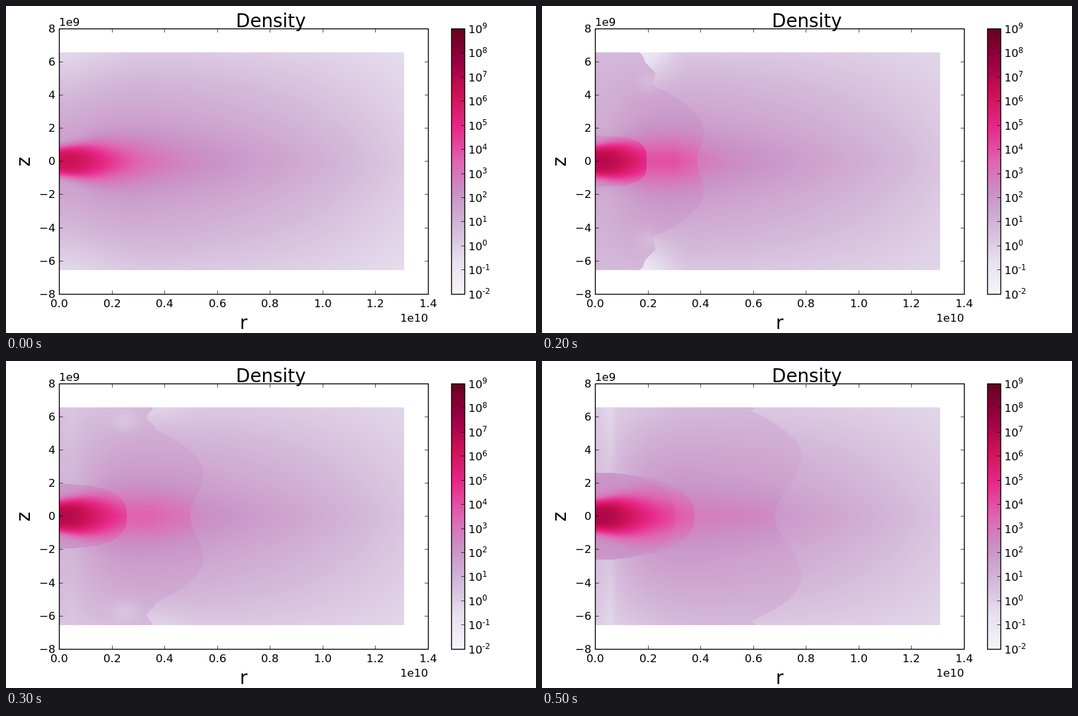
Write an HTML page with a canvas that moves like this. It is 800 px wide and 494 px high and loops after 0.6 s.

```html
<!DOCTYPE html>
<html lang="en">
<head>
<meta charset="utf-8">
<title>Density</title>
<style>
html, body { margin: 0; width: 100%; height: 100%; overflow: hidden; background: #fff; }
canvas { display: block; }
</style>
</head>
<body>
<canvas id="stage" width="800" height="494"></canvas>
<script>
const STEP = 100, COUNT = 6;
const W = 521, HALF = 165, H = 2 * HALF - 1;   // density map, in pixels
const LEFT = 80, TOP = 70;
const AX = { x: 80.5, y: 34.42, w: 557, h: 400.8 };
const FONT = '"DejaVu Sans", Verdana, sans-serif';
const STOPS = ['f7f4f9', 'e7e1ef', 'd4b9da', 'c994c7', 'df65b0', 'e7298a', 'ce1256', '980043', '67001f'];
const ctx = document.getElementById('stage').getContext('2d');

const clamp = (x, a = 0, b = 1) => Math.min(b, Math.max(a, x));
const smooth = x => { x = clamp(x); return x * x * (3 - 2 * x); };
const bell = x => Math.exp(-x * x);
const snap = x => Math.floor(x) + .5;

// Undisturbed disc, in log10 density by radius u
const mantle = u => 2.3 - 2.2 * (u / W) ** 2 - .35 * bell(u / 50);
const hot = u => 4.35 / (1 + (u / 85) ** 2.5);
const width = u => 22 + 18 * (1 - Math.exp(-u / 100));
const sharpness = u => 2 + 2 * bell(u / 50);

// A zone falls from its mantle to its far value with height v, plus a hot midplane
function zone({ mid, far, heat, wide = width, power = 2.2 }) {
  const table = f => Float32Array.from({ length: W }, (_, u) => f(u));
  const [m, f, a, w, q] = [mid, far, heat, wide, sharpness].map(table);
  const fall = Float32Array.from({ length: HALF }, (_, v) => 1 - (v / HALF) ** power);
  return (u, v) => f[u] + (m[u] - f[u]) * fall[v]
    + (v < 110 ? a[u] * Math.exp(-((v / w[u]) ** q[u])) : 0);
}

const ambient = k => {
  const gain = k ? .2 : 0;
  return zone({
    mid: u => mantle(u) + gain * (u / W) ** 2,
    far: u => .3 - .65 * bell(u / 80) - .75 * (u / W) ** 2 + gain * (u / W),
    heat: hot,
    power: 1.3
  });
};

// Gas behind the outer shock at step k
const shocked = k => zone({
  mid: u => mantle(u) + .15 + .35 / k - 1.8 * (1 - 1 / k) * bell(u / 60),
  far: u => .75 - .7 * clamp((k - 2) / 2) * bell(u / 90),
  heat: u => Math.min(hot(u) + .2, 2.2 - .35 * k),
  wide: () => 35,
  power: 1.2
});

const inner = () => zone({
  mid: () => 2.4,
  far: () => .5,
  heat: u => hot(u) + .15,
  wide: u => width(u) * 1.1,
  power: 1.2
});

// Outer shock radius by height: a bulging front joined to a polar plume
function outerEdge(k) {
  const nose = 100 * k ** .62, bulge = 10 * (k - 1), peak = 45 * Math.sqrt(k - 1);
  const plume = 46 * k + 2, tip = 98 * k ** .9;
  return v => {
    const front = v < peak
      ? nose + bulge * smooth(v / peak)
      : nose + bulge - .016 * (v - peak) ** 2;
    const column = v < tip
      ? plume * Math.sqrt(1 - (v / tip) ** 6) * (1 + .04 * Math.sin(v / 5))
      : -1;
    return Math.max(front > 0 ? front : -1, column);
  };
}

// Rounded box with half axes a and b
const dome = (a, b, n) => v => v < b ? a * (1 - (v / b) ** n) ** (1 / n) : -1;

const coreEdge = k => dome(30 + 24 * k, 18 + 46 * ((k - 1) / 4) ** .6, 2.2 + 4 / k ** 2);
const echoEdge = k => k < 4 ? () => -1 : dome(92 + 29 * (k - 4), 31 + 35 * (k - 4), 2.4);

// Thin gas in the wake: a vortex in the plume and a streak beside the pole
function wake(k, u, v) {
  const vortex = .55 * bell((u - 40 - 20 * k) / (8 + 4 * k)) * bell((v - 70 - 24 * k) / 15);
  const streak = .12 * Math.max(0, k - 2) * bell((u - 22) / 9) * smooth(v / 110);
  return (k < 5 ? vortex : 0) + streak;
}

// Emptied gas above the shock
function hollow(k, u, v) {
  const from = 55 * k - 45, span = 40 * k;
  return (2 - .4 * k) * smooth((from + span - u) / span) * smooth((v - 30 - 25 * k) / 95);
}

function densityAt(k) {
  const still = ambient(k);
  if (!k) return still;
  const blast = shocked(k), core = inner();
  const [outer, middle, echo] = [outerEdge(k), coreEdge(k), echoEdge(k)];
  return (u, v) => {
    const inEcho = u <= echo(v);
    if (inEcho || u <= middle(v)) return core(u, v) + (inEcho ? .2 : 0);
    if (u <= outer(v)) return blast(u, v) - wake(k, u, v);
    return still(u, v) - hollow(k, u, v);
  };
}

// Colour table over 10^-2 .. 10^9
const rgb = STOPS.map(h => [0, 2, 4].map(i => parseInt(h.slice(i, i + 2), 16)));
const palette = Array.from({ length: 1101 }, (_, i) => {
  const p = i / 1100 * 8, k = Math.min(7, Math.floor(p));
  const [r, g, b] = rgb[k].map((c, j) => Math.round(c + (rgb[k + 1][j] - c) * (p - k)));
  return (255 << 24 | b << 16 | g << 8 | r) >>> 0;
});

function drawMap(k) {
  const map = document.createElement('canvas');
  map.width = W;
  map.height = H;
  const g = map.getContext('2d'), img = g.createImageData(W, H);
  const px = new Uint32Array(img.data.buffer), density = densityAt(k);
  for (let v = 0; v < HALF; v++) {
    for (let u = 0; u < W; u++) {
      const c = palette[Math.round(clamp(density(u, v) + 2, 0, 11) * 100)];
      px[(HALF - 1 - v) * W + u] = px[(HALF - 1 + v) * W + u] = c;
    }
  }
  g.putImageData(img, 0, 0);
  return map;
}

// Text starts on whole pixels; align is 0 left, .5 centre, 1 right
function text(str, x, y, size, align = .5) {
  ctx.font = `${size}px ${FONT}`;
  ctx.fillText(str, Math.round(x - align * ctx.measureText(str).width), Math.round(y));
}

function line(x0, y0, x1, y1) {
  ctx.beginPath();
  ctx.moveTo(x0, y0);
  ctx.lineTo(x1, y1);
  ctx.stroke();
}

function box(x, w) {
  const y = snap(AX.y);
  ctx.lineWidth = 1.39;
  ctx.strokeRect(x, y, w, snap(AX.y + AX.h) - y);
}

function drawAxes() {
  const { x, y, w, h } = AX, small = 16.67, big = 27.78;
  const top = snap(y), bottom = snap(y + h);
  ctx.fillStyle = ctx.strokeStyle = '#000';
  ctx.lineWidth = .7;
  for (let i = 0; i < 8; i++) {
    const tx = Math.round(x + w * i / 7 - .5) + .5;
    line(tx, top, tx, top + 5.5);
    line(tx, bottom, tx, bottom - 5.5);
    text((i * .2).toFixed(1), tx - .5, 455, small);
  }
  for (let i = 0; i < 9; i++) {
    const ty = snap(y + h * i / 8), n = 8 - 2 * i;
    line(x, ty, x + 5.5, ty);
    line(x + w, ty, x + w - 5.5, ty);
    text(n < 0 ? '\u2212' + -n : n, 74.5, y + h * i / 8 + 5.5, small, 1);
  }
  box(x, w);
  text('1e9', 80, 30, small, 0);
  text('1e10', 637, 477, small, 1);
  text('Density', 399.5, 32, big);
  text('r', 358.5, 488, big);
  ctx.save();
  ctx.translate(36, 235.5);
  ctx.rotate(-Math.PI / 2);
  text('z', 0, 0, big);
  ctx.restore();
}

function drawBar() {
  const x = 672.5, { y, h } = AX, w = 20;
  const ramp = ctx.createLinearGradient(0, y + h, 0, y);
  STOPS.forEach((c, i) => ramp.addColorStop(i / 8, '#' + c));
  ctx.fillStyle = ramp;
  ctx.fillRect(x, y, w, h);
  ctx.fillStyle = '#000';
  ctx.lineWidth = .7;
  for (let n = -2; n <= 9; n++) {
    const ty = y + h * (9 - n) / 11;
    line(x + w, snap(ty), x + w - 5.5, snap(ty));
    text('10', 697.5, ty + 6.5, 16.67, 0);
    text(n, 719, ty, 11.67, 0);
  }
  box(x, w);
}

const maps = Array.from({ length: COUNT }, (_, k) => drawMap(k));
const start = performance.now();
let shown = -1;

function tick() {
  const k = Math.floor((performance.now() - start) / STEP) % COUNT;
  if (k !== shown) {
    shown = k;
    ctx.fillStyle = '#fff';
    ctx.fillRect(0, 0, 800, 494);
    ctx.drawImage(maps[k], LEFT, TOP);
    drawAxes();
    drawBar();
  }
  requestAnimationFrame(tick);
}
tick();
</script>
</body>
</html>
```
